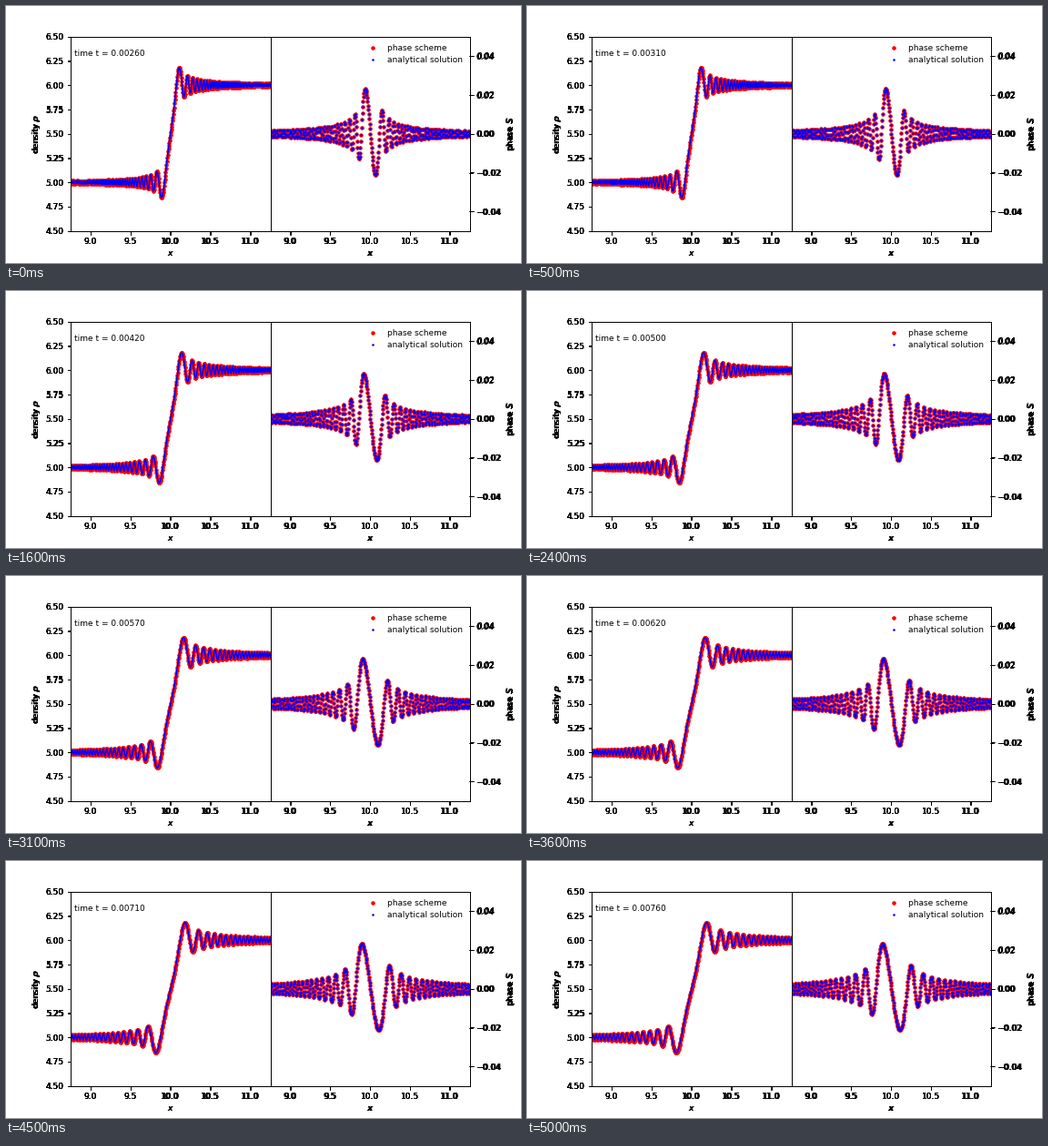
Write a matplotlib script that moves like this. It is 566 px wide and 283 px high and loops after 5.1 s.

```python
"""Quantum step: density and phase of a spreading discontinuity."""
import matplotlib.pyplot as plt
import numpy as np
from matplotlib.animation import FuncAnimation

FRAMES, INTERVAL = 51, 100
T_START, T_STEP = 0.0026, 0.0001
X_STEP, RHO_LEFT, RHO_RIGHT = 10.0, 5.0, 6.0
WIDTH, HEIGHT, DPI = 566, 283, 72
OVERDRAW = 3  # repeated drawing gives the heavy tick labels

# Layout sizes in pixels: the stage, and its unrounded 20 x 10 cm
STAGE = (WIDTH, HEIGHT)
PAPER = (20 / 2.54 * DPI, 10 / 2.54 * DPI)

plt.rcParams.update({"font.family": "DejaVu Sans", "font.size": 9,
                     "text.kerning_factor": 6})

x = X_STEP + 0.005 * np.arange(-252, 253)

# Running Fresnel integral of exp(i s^2), tabulated once
s = np.linspace(0, 20, 60001)
wave = np.exp(1j * s**2)
fresnel = np.concatenate(([0], np.cumsum((wave[1:] + wave[:-1]) / 2))) * s[1]


def solve(t):
    """Return density and phase of the free wave at time t."""
    u = (x - X_STEP) / np.sqrt(2 * t)
    front = np.sign(u) * np.interp(np.abs(u), s, fresnel)
    mix = 0.5 + front / np.sqrt(1j * np.pi)
    left, right = np.sqrt(RHO_LEFT), np.sqrt(RHO_RIGHT)
    psi = left + (right - left) * mix
    return np.abs(psi) ** 2, np.angle(psi)


def add_axes(size, left, ylim, ylabel, side):
    kx, ky = size[0] / WIDTH, size[1] / HEIGHT
    ax = fig.add_axes([left * kx, 0.125 * ky, 0.3875 * kx, 0.755 * ky],
                      facecolor="none")
    ax.set(xlim=(8.75, 11.25), ylim=ylim, xlabel="$x$", ylabel=ylabel)
    ax.yaxis.set_label_position(side)
    ax.yaxis.set_ticks_position(side)
    return ax


def add_panel(*spec):
    """Stack axes of both layouts and return the top one."""
    for _ in range(OVERDRAW):
        add_axes(STAGE, *spec).spines[:].set_visible(False)
        top = add_axes(PAPER, *spec)
    return top


def add_curves(ax, style):
    red, = ax.plot([], [], "r.", ms=7, label="phase scheme")
    blue, = ax.plot([], [], style, ms=3, lw=1.5, label="analytical solution")
    return red, blue


fig = plt.figure(figsize=(WIDTH / DPI, HEIGHT / DPI), dpi=DPI,
                 facecolor="white")
ax_rho = add_panel(0.125, (4.5, 6.5), r"density $\rho$", "left")
ax_phase = add_panel(0.5125, (-0.05, 0.05), "phase $S$", "right")
rho_curves = add_curves(ax_rho, "b-")
phase_curves = add_curves(ax_phase, "b.")
ax_phase.legend(loc="upper right", frameon=False)
clock = ax_rho.text(0.02, 0.9, "", transform=ax_rho.transAxes)


def update(frame):
    t = T_START + T_STEP * frame
    rho, phase = solve(t)
    for curve in rho_curves:
        curve.set_data(x, rho)
    for curve in phase_curves:
        curve.set_data(x, phase)
    clock.set_text(f"time t = {t:.5f}")
    return (*rho_curves, *phase_curves, clock)


anim = FuncAnimation(fig, update, frames=FRAMES, interval=INTERVAL,
                     repeat=True, repeat_delay=0, blit=False)
plt.show()
```
